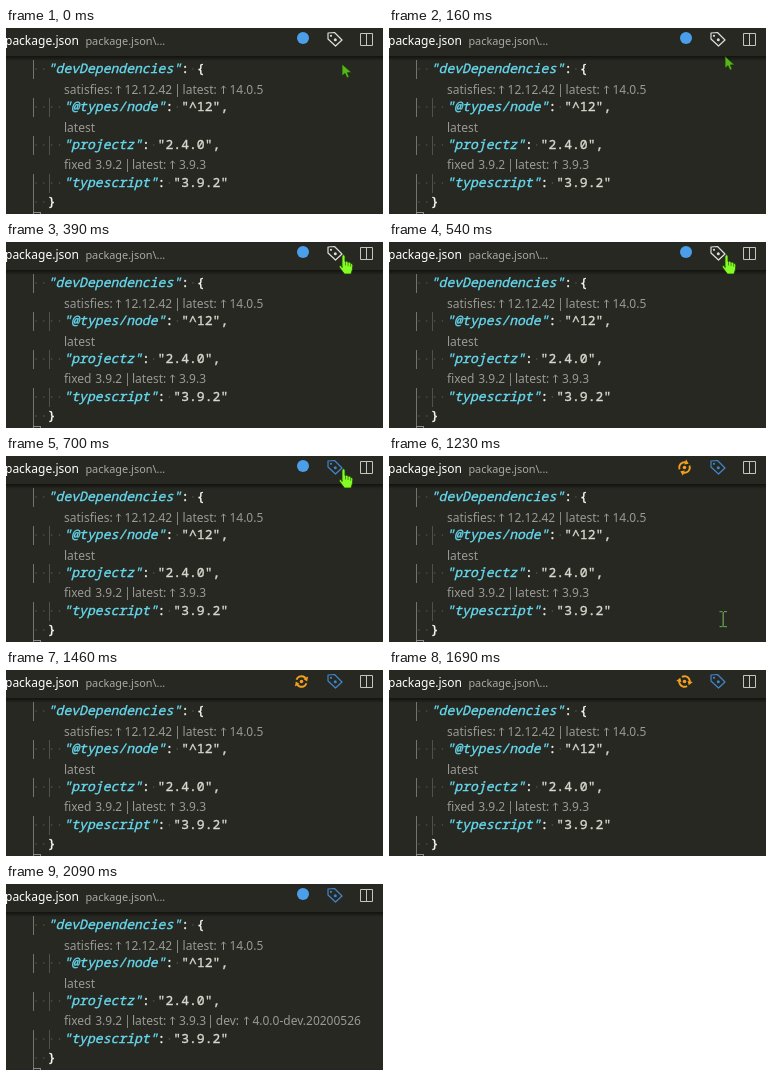
An HTML page with a canvas for the animation above (3.87 s loop, 377 by 186 pixels).

```html
<!DOCTYPE html>
<html lang="en">
<head>
<meta charset="utf-8">
<title>Dependency versions</title>
<style>
  html, body { margin: 0; width: 100%; height: 100%; overflow: hidden; background: #272822; }
  canvas { display: block; width: 377px; height: 186px; }
</style>
</head>
<body>
<canvas id="stage"></canvas>
<script>
const W = 377, H = 186, LOOP = 3870;
const SANS = '"Noto Sans", "Open Sans", sans-serif';
const MONO = '13.08px "Noto Sans Mono", "DejaVu Sans Mono", monospace';
const BLUE = '#4b9fea', TAG_BLUE = '#3f86ca', ORANGE = '#f2a01e', GREY = '#c5c5c0';
const PLAIN = '#f8f8f2', STRING = '#d8d8cc', KEY = '#66d9ef', DIM = '#999995';
const TICKS = [0, 80, 150, 230, 310, 390, 460, 540, 620, 700, 850, 930, 1000, 1080,
  1160, 1230, 1310, 1390, 1460, 1540, 1620, 1690, 1770, 1850, 1920, 2090];
const CHAR = 7.85, LEFT = 26, LINE = 19;

const canvas = document.getElementById('stage');
const ctx = canvas.getContext('2d');
const dpr = window.devicePixelRatio || 1;
canvas.width = Math.round(W * dpr);
canvas.height = Math.round(H * dpr);

const col = n => LEFT + n * CHAR;
const ease = p => p * p * (3 - 2 * p);
const progress = (t, a, b) => Math.min(1, Math.max(0, (t - a) / (b - a)));

function text(str, x, y, color, font) {
  ctx.font = font;
  ctx.fillStyle = color;
  ctx.fillText(str, x, y);
}

// Code is set a little heavier than the regular weight.
function mono(str, n, y, color, style = '') {
  text(str, col(n), y, color, `${style} ${MONO}`);
  ctx.strokeStyle = color;
  ctx.lineWidth = 0.35;
  ctx.strokeText(str, col(n), y);
}

function dot(x, y, r, color) {
  ctx.fillStyle = color;
  ctx.beginPath();
  ctx.arc(x, y, r, 0, Math.PI * 2);
  ctx.fill();
}

function polygon(points) {
  ctx.beginPath();
  points.forEach(([x, y]) => ctx.lineTo(x, y));
  ctx.closePath();
}

function header() {
  const shadow = ctx.createLinearGradient(0, 28, 0, 33);
  shadow.addColorStop(0, 'rgba(0, 0, 0, 0.55)');
  shadow.addColorStop(1, 'rgba(0, 0, 0, 0)');
  ctx.fillStyle = shadow;
  ctx.fillRect(0, 28, W, 5);
  text('package.json', -1, 17, '#ffffff', `12px ${SANS}`);
  text('package.json\\...', 79.4, 17, '#a9a9a4', `10.9px ${SANS}`);
}

function tag(color) {
  ctx.strokeStyle = color;
  ctx.lineWidth = 1.2;
  ctx.lineJoin = 'round';
  polygon([[322, 5], [328.5, 4.5], [336, 12], [329.5, 18], [322, 11]]);
  ctx.stroke();
  dot(325, 7.8, 1.1, color);
  dot(329.3, 11.8, 1.5, color);
}

function splitIcon() {
  ctx.strokeStyle = GREY;
  ctx.lineWidth = 1;
  ctx.lineJoin = 'round';
  ctx.strokeRect(354.5, 5.5, 12, 12);
  ctx.fillStyle = GREY;
  ctx.fillRect(360, 6, 1, 11);
}

function spinner(angle) {
  ctx.save();
  ctx.translate(295.5, 11.5);
  dot(0, 0, 1.8, ORANGE);
  ctx.rotate(angle);
  for (let i = 0; i < 2; i++) {
    ctx.strokeStyle = ORANGE;
    ctx.lineWidth = 1.9;
    ctx.beginPath();
    ctx.arc(0, 0, 5.3, -1.1, 1.1);
    ctx.stroke();
    ctx.fillStyle = ORANGE;
    polygon([[4.2, 7.2], [-0.6, 5.6], [2.2, 2.2]]);
    ctx.fill();
    ctx.rotate(Math.PI);
  }
  ctx.restore();
}

function space(n, y) {
  dot(col(n + 0.5), y - 4, 0.8, '#55564f');
}

function indent(y, depth) {
  for (let n = 0; n < depth; n++) space(n, y);
  for (let n = 0; n < depth; n += 2) {
    ctx.fillStyle = n ? '#50514a' : '#73746c';
    ctx.fillRect(Math.round(col(n)) + 1, y - 13, 1, LINE);
  }
}

function entry(y, depth, key, value, valueColor) {
  const quoted = `"${key}"`, end = depth + quoted.length;
  indent(y, depth);
  mono(quoted, depth, y, KEY, 'italic');
  mono(':', end, y, PLAIN);
  space(end + 1, y);
  mono(value, end + 2, y, valueColor);
}

// A lens is a list of [text, x].
function lens(y, parts) {
  for (const [str, x] of parts) {
    if (str === '↑') upArrow(x, y);
    else if (str === '|') {
      ctx.fillStyle = '#858581';
      ctx.fillRect(Math.round(x + 1), y - 10, 1, 13);
    } else text(str, x, y, DIM, `12px ${SANS}`);
  }
}

function upArrow(x, y) {
  const mid = Math.round(x + 2.5) + 0.5;
  ctx.strokeStyle = DIM;
  ctx.lineWidth = 1;
  ctx.lineJoin = 'miter';
  ctx.beginPath();
  ctx.moveTo(mid, y);
  ctx.lineTo(mid, y - 8);
  ctx.moveTo(mid - 2.3, y - 5.7);
  ctx.lineTo(mid, y - 8);
  ctx.lineTo(mid + 2.3, y - 5.7);
  ctx.stroke();
}

function code(showDev) {
  entry(45, 2, 'devDependencies', '{', PLAIN);
  lens(66, [['satisfies:', 58], ['↑', 109], ['12.12.42', 118.6], ['|', 170],
    ['latest:', 176.6], ['↑', 214], ['14.0.5', 223.4]]);
  entry(83, 4, '@types/node', '"^12",', STRING);
  lens(104, [['latest', 58]]);
  entry(121, 4, 'projectz', '"2.4.0",', STRING);
  const fixed = [['fixed', 58], ['3.9.2', 89.2], ['|', 119.5], ['latest:', 126],
    ['↑', 163.5], ['3.9.3', 173]];
  const dev = [['|', 203.2], ['dev:', 209.8], ['↑', 237], ['4.0.0-dev.20200526', 246.4]];
  lens(141, showDev ? fixed.concat(dev) : fixed);
  entry(159, 4, 'typescript', '"3.9.2"', STRING);
  indent(178, 2);
  mono('}', 2, 178, PLAIN);
  // Top of the matched-bracket box on the line below.
  ctx.strokeStyle = '#888888';
  ctx.lineWidth = 1;
  ctx.strokeRect(27.5, 184.5, 7, LINE);
}

function arrowCursor(x, y) {
  ctx.save();
  ctx.translate(x, y);
  polygon([[0, 0], [0, 12], [3, 9.5], [5, 14], [7.2, 13], [5.4, 8.8], [9.5, 8.6]]);
  ctx.fillStyle = '#58b51c';
  ctx.fill();
  ctx.strokeStyle = '#183808';
  ctx.lineWidth = 0.8;
  ctx.stroke();
  ctx.restore();
}

function handCursor(x, y) {
  ctx.save();
  ctx.translate(x, y);
  ctx.beginPath();
  ctx.moveTo(2, 13);
  ctx.lineTo(2, 1.5);
  ctx.quadraticCurveTo(3.5, -0.8, 5, 1.5);
  ctx.lineTo(5, 7);
  ctx.quadraticCurveTo(7, 6, 8, 7.8);
  ctx.quadraticCurveTo(10, 7, 10.6, 8.8);
  ctx.quadraticCurveTo(12.8, 8.6, 12.8, 11);
  ctx.lineTo(12.4, 15);
  ctx.lineTo(11, 19.5);
  ctx.lineTo(4.5, 19.5);
  ctx.lineTo(-0.8, 12.5);
  ctx.quadraticCurveTo(-1, 10, 2, 11.5);
  ctx.closePath();
  ctx.fillStyle = '#84fb24';
  ctx.fill();
  ctx.strokeStyle = '#1c4208';
  ctx.lineWidth = 0.8;
  ctx.stroke();
  ctx.fillStyle = '#2f6a10';
  for (let i = 0; i < 3; i++) ctx.fillRect(5 + i * 2.7, 7.5 + i * 0.6, 0.7, 3.5);
  ctx.restore();
}

function beamCursor(x, y) {
  ctx.fillStyle = '#5f9a48';
  ctx.fillRect(x - 0.5, y - 7, 1.4, 15);
  for (const edge of [y - 8, y + 7]) {
    ctx.fillRect(x - 3.5, edge, 3, 1.2);
    ctx.fillRect(x + 1, edge, 3, 1.2);
  }
}

function cursor(t) {
  if (t >= 1310) return;
  if (t < 850) {
    const y = 36 - 23.5 * ease(progress(t, 0, 390));
    if (y > 22) arrowCursor(336, y);
    else handCursor(334, y);
    return;
  }
  const p = progress(t, 780, 1230);
  const y = 15 + 148 * Math.pow(p, 1.5);
  if (y < 32) arrowCursor(335, y);
  else beamCursor(334, Math.round(y));
}

function draw(now) {
  const time = now % LOOP;
  const t = TICKS.filter(tick => tick <= time).pop();
  ctx.setTransform(dpr, 0, 0, dpr, 0, 0);
  ctx.fillStyle = '#272822';
  ctx.fillRect(0, 0, W, H);
  header();
  code(t >= 2090);
  if (t >= 850 && t < 1920) spinner((t - 1000) / 2000 * Math.PI * 2);
  else dot(297, 10, 6, BLUE);
  tag(t >= 700 ? TAG_BLUE : '#dededa');
  splitIcon();
  cursor(t);
}

const start = performance.now();
function frame() {
  draw(performance.now() - start);
  requestAnimationFrame(frame);
}
draw(0);
requestAnimationFrame(frame);
</script>
</body>
</html>
```
